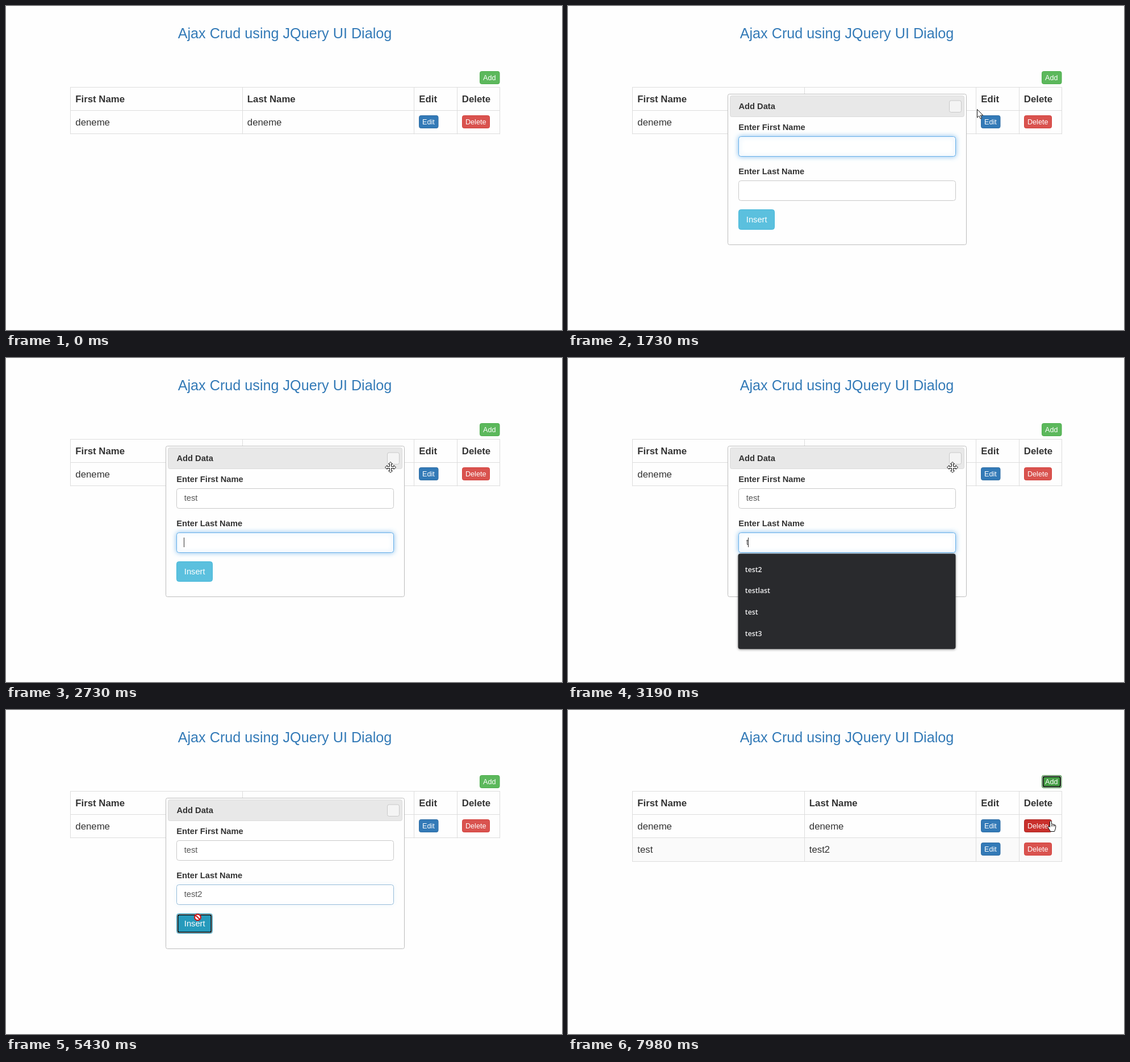
Animation, 979 px wide and 572 px high, one loop 8 s. Source, as an HTML page with a canvas:

```html
<!DOCTYPE html>
<html lang="en">
<head>
<meta charset="utf-8">
<title>Ajax Crud</title>
<style>
  html, body { margin: 0; width: 100%; height: 100%; overflow: hidden; background: #fefefe; }
  canvas { display: block; }
</style>
</head>
<body>
<canvas id="stage" width="979" height="572"></canvas>
<script>
const ctx = document.getElementById('stage').getContext('2d');
const LOOP = 8000;
const SANS = '"Liberation Sans", Arial, sans-serif';
const LIST_FONT = '600 12.3px "Open Sans", "Noto Sans", sans-serif';

// Pointer moves: first step, last step, then one stop per step.
const moves = [
  [260, 870, [[907, 549], [890, 440], [865, 320], [845, 207], [842, 160], [846, 115], [850, 95], [851, 112], [851, 123]]],
  [1650, 1810, [[800, 148], [720, 182], [677, 193]]],
  [4430, 4660, [[600, 215], [480, 268], [390, 306], [350, 325]]],
  [4890, 5350, [[349, 328], [347, 333], [344, 341], [341, 350], [339, 358], [338, 363], [337, 366]]],
  [5970, 6740, [[345, 360], [395, 330], [460, 285], [535, 245], [587, 229], [603, 230], [608, 237], [611, 244], [615, 249], [620, 252], [623, 252]]],
  [6810, 6810, [[634, 242]]],
  [7440, 7980, [[648, 238], [690, 217], [742, 190], [796, 167], [848, 155], [866, 159], [858, 182], [850, 195]]]
];

// Typing: time and resulting value.
const firstName = [[2040, 't'], [2110, 'te'], [2270, 'tes'], [2350, 'test']];
const lastName = [[3190, 't'], [3340, 'tes'], [3500, 'test'], [3880, 'test2']];
const firstHints = ['test', 'test1', 'test2', 'testuser', 'testuser1', 'testzz'];
const lastHints = ['test2', 'testlast', 'test', 'test3'];

const COLORS = {
  success: ['#5cb85c', '#4cae4c', '#449d44', '#398439'],
  primary: ['#337ab7', '#2e6da4', '#286090', '#204d74'],
  danger: ['#d9534f', '#d43f3a', '#c9302c', '#ac2925'],
  info: ['#5bc0de', '#46b8da', '#31b0d5', '#269abc']
};

const within = (t, a, b) => t >= a && t < b;

function pointer(t) {
  let spot = null;
  for (const [start, end, stops] of moves) {
    if (t < start) break;
    const last = stops.length - 1;
    const i = end > start ? Math.floor((t - start) / (end - start) * last + 0.1) : last;
    spot = stops[Math.min(last, i)];
  }
  return spot;
}

function typed(keys, t) {
  let value = '';
  for (const [at, text] of keys) if (t >= at) value = text;
  return value;
}

// Two-step fade of a field's focus.
function focusLevel(t, on, off) {
  if (t < on || t >= off + 160) return 0;
  if (t >= off) return t < off + 80 ? 0.5 : 0;
  return t < on + 70 ? 0.5 : 1;
}

function text(str, x, y, size, color = '#333', bold = false) {
  ctx.font = (bold ? 'bold ' : '') + size + 'px ' + SANS;
  ctx.fillStyle = color;
  ctx.fillText(str, x, y);
}

function box(x, y, w, h, r, fill, line, width = 1) {
  ctx.beginPath();
  ctx.roundRect(x + width / 2, y + width / 2, w - width, h - width, r);
  if (fill) { ctx.fillStyle = fill; ctx.fill(); }
  if (line) { ctx.strokeStyle = line; ctx.lineWidth = width; ctx.stroke(); }
}

function ring(x, y, w, h) {
  box(x + 1, y + 1, w - 2, h - 2, 2.5, null, '#fff');
  box(x + 1.7, y + 1.7, w - 3.4, h - 3.4, 2.5, null, '#101010', 1.8);
}

function button(label, x, y, w, h, kind, state, size = 12.6) {
  const c = COLORS[kind];
  const fill = state.active ? c[3] : state.hover ? c[2] : c[0];
  box(x, y, w, h, size > 13 ? 4 : 3, fill, state.hover || state.active ? c[3] : c[1]);
  if (state.ring) ring(x, y, w, h);
  const big = size > 13;
  text(label, x + (big ? 13.8 : 6), y + (big ? 23 : 16), size, '#fff');
}

function table(rows, hot, addState) {
  const bottom = 184 + rows.length * 41.3;
  rows.forEach((row, i) => {
    if (i % 2) { ctx.fillStyle = '#fafafa'; ctx.fillRect(114, 184 + i * 41, 755, 42); }
  });
  ctx.fillStyle = '#ddd';
  for (let i = -1; i <= rows.length; i++) ctx.fillRect(113, Math.round(184 + i * 41.3), 757, 1);
  for (const x of [113, 416, 718, 794, 869]) ctx.fillRect(x, 143, 1, bottom - 142);

  text('First Name', 122.3, 170, 16.8, '#333', true);
  text('Last Name', 424.8, 170, 16.8, '#333', true);
  text('Edit', 727.3, 170, 16.8, '#333', true);
  text('Delete', 802.8, 170, 16.8, '#333', true);
  rows.forEach(([first, last], i) => {
    const y = Math.round(193 + i * 41.3);
    text(first, 122.3, y + 18, 16.8);
    text(last, 424.8, y + 18, 16.8);
    button('Edit', 727, y, 34.5, 23, 'primary', {});
    button('Delete', 803, y, 49, 23, 'danger', { hover: hot === 'del' + i });
  });
  button('Add', 834, 115, 35.5, 23, 'success', addState);
}

function dialog(title, x, y, w, h, focused) {
  box(x, y, w, h, 3, '#fefefe', '#bcbcbc');
  box(x + 4, y + 3, w - 8, 38, 3, '#e8e8e8', '#dadada');
  text(title, x + 19.4, y + 27, 14.7, '#333', true);
  box(x + w - 31, y + 11.5, 22, 21.5, 3, '#f4f4f4', '#c8c8c8');
  if (focused) box(x + w - 31, y + 11.5, 22, 21.5, 3, '#ededed', '#111', 2);
}

function field(label, y, value, level, caret) {
  text(label, 300.2, y - 11, 14.7, '#333', true);
  ctx.save();
  ctx.shadowColor = `rgba(102,175,233,${0.75 * level ** 3})`;
  ctx.shadowBlur = 8;
  const mix = (a, b) => Math.round(a + (b - a) * level);
  box(300, y, 383, 36, 4, '#fff', `rgb(${mix(200, 102)},${mix(200, 175)},${mix(200, 233)})`);
  ctx.restore();
  text(value, 313.7, y + 22, 14.7, '#555');
  if (caret) {
    const x = Math.floor(313.7 + ctx.measureText(value).width - 0.5);
    ctx.fillStyle = '#333';
    ctx.fillRect(x, y + 9, 1, 17);
  }
}

function hints(items, y, w) {
  ctx.save();
  ctx.shadowColor = 'rgba(0,0,0,.45)';
  ctx.shadowBlur = 4;
  ctx.shadowOffsetY = 1;
  box(299, y, w, items.length * 37.85 + 17.8, 4, '#292a2d');
  ctx.restore();
  ctx.font = LIST_FONT;
  ctx.fillStyle = '#f0f0f1';
  items.forEach((item, i) => ctx.fillText(item, 311.8, y + 32.5 + i * 37.85));
}

function addDialog(t, hot) {
  dialog('Add Data', 281, 155, 421, 267, false);
  field('Enter First Name', 230, typed(firstName, t), focusLevel(t, 1200, 2650),
    t < 2650 && !within(t, 1730, 2040));
  field('Enter Last Name', 308, typed(lastName, t), focusLevel(t, 2650, 5430),
    t >= 2730 && t < 5350 && !within(t, 4430, 4890));
  const pressed = t >= 5350;
  button('Insert', 300, 359, 64, 36, 'info', { hover: hot === 'insert', active: pressed, ring: pressed }, 14.7);
  if (within(t, 2040, 2650)) hints(firstHints, 266, 383);
  if (within(t, 3190, 3880)) hints(lastHints, 345, 384);
}

// Topmost thing under the pointer: [name, cursor, x, y, w, h].
function hit(x, y, t, adding, done) {
  const areas = [];
  if (adding) areas.push(
    ['close', 'hand', 671, 166, 22, 22], ['head', 'move', 285, 158, 413, 38],
    ['first', 'beam', 300, 230, 383, 36], ['last', 'beam', 300, 308, 383, 36],
    ['insert', t >= 5430 ? 'ban' : 'hand', 300, 359, 64, 36], ['body', 'arrow', 281, 155, 421, 267]);
  if (done) areas.push(
    ['close', 'hand', 618, 229, 22, 22], ['head', 'move', 338, 221, 307, 38],
    ['body', 'arrow', 334, 217, 315, 142]);
  areas.push(['add', 'hand', 834, 115, 36, 23], ['del0', 'hand', 803, 193, 49, 23],
    ['edit0', 'hand', 727, 193, 35, 23]);
  return areas.find(([, , ax, ay, w, h]) => x >= ax && x < ax + w && y >= ay && y < ay + h) || ['', 'arrow'];
}

function shape(points) {
  ctx.beginPath();
  for (const [x, y] of points) ctx.lineTo(x, y);
  ctx.closePath();
  ctx.fill();
  ctx.stroke();
}

const cursors = {
  arrow() {
    shape([[0.5, 0.5], [0.5, 15], [3.8, 11.9], [6.2, 17], [8.5, 16], [6.2, 11], [10.8, 11]]);
  },
  hand() {
    ctx.beginPath();
    ctx.moveTo(-1.5, 12);
    ctx.lineTo(-1.5, 2);
    ctx.quadraticCurveTo(0, -0.8, 1.5, 2);
    ctx.lineTo(1.5, 6.5);
    ctx.quadraticCurveTo(3.2, 5.4, 4, 7.2);
    ctx.quadraticCurveTo(5.6, 6.2, 6.5, 8);
    ctx.quadraticCurveTo(8.6, 7.4, 8.8, 10);
    ctx.lineTo(8.5, 14);
    ctx.lineTo(6.5, 19.5);
    ctx.lineTo(-0.5, 19.5);
    ctx.lineTo(-4.8, 12.2);
    ctx.quadraticCurveTo(-5, 9.5, -2.6, 10.7);
    ctx.closePath();
    ctx.fill();
    ctx.stroke();
    ctx.beginPath();
    for (const x of [1.5, 4, 6.5]) { ctx.moveTo(x, 7.5); ctx.lineTo(x, 10.5); }
    ctx.stroke();
  },
  move() {
    const arm = [[0, -9.5], [3.5, -6], [1.5, -6], [1.5, -1.5], [6, -1.5], [6, -3.5]];
    const points = [];
    for (let i = 0; i < 4; i++)
      for (const [x, y] of arm) points.push([[x, y], [-y, x], [-x, -y], [y, -x]][i]);
    shape(points);
  },
  beam() {
    ctx.strokeStyle = '#222';
    ctx.beginPath();
    for (const s of [-1, 1]) {
      ctx.moveTo(-3, 8.5 * s);
      ctx.quadraticCurveTo(0.5, 8.5 * s, 0.5, 6 * s);
      ctx.quadraticCurveTo(0.5, 8.5 * s, 4, 8.5 * s);
    }
    ctx.moveTo(0.5, -7);
    ctx.lineTo(0.5, 7);
    ctx.stroke();
  },
  ban() {
    ctx.strokeStyle = '#d01818';
    ctx.lineWidth = 2.2;
    ctx.beginPath();
    ctx.arc(0.5, 0, 5.4, 0, 7);
    ctx.fill();
    ctx.moveTo(-3.3, -3.8);
    ctx.lineTo(4.3, 3.8);
    ctx.stroke();
  }
};

function drawCursor(kind, x, y) {
  ctx.save();
  ctx.translate(x, y);
  ctx.fillStyle = '#fff';
  ctx.strokeStyle = '#111';
  ctx.lineWidth = 1;
  ctx.lineJoin = 'round';
  cursors[kind]();
  ctx.restore();
}

function draw(t) {
  const adding = within(t, 1200, 5510);
  const done = within(t, 5510, 7060);
  const spot = pointer(t);
  const [hot, kind] = spot ? hit(...spot, t, adding, done) : [''];

  ctx.fillStyle = '#fefefe';
  ctx.fillRect(0, 0, 979, 572);
  ctx.textAlign = 'center';
  text('Ajax Crud using JQuery UI Dialog', 491, 57, 25.2, '#337ab7');
  ctx.textAlign = 'left';

  const rows = [['deneme', 'deneme']];
  if (t >= 5510) rows.push(['test', 'test2']);
  const pressed = within(t, 1120, 1200);
  const focused = pressed || t >= 7060;
  table(rows, hot, { hover: hot === 'add' || focused, active: pressed, ring: focused });

  if (adding) addDialog(t, hot);
  if (done) {
    dialog('Action', 334, 217.5, 315, 141.5, true);
    text('Data Inserted...', 352.5, 281, 14.7);
  }
  if (spot) drawCursor(kind, ...spot);
}

function tick() {
  draw(performance.now() % LOOP);
  requestAnimationFrame(tick);
}
tick();
</script>
</body>
</html>
```
